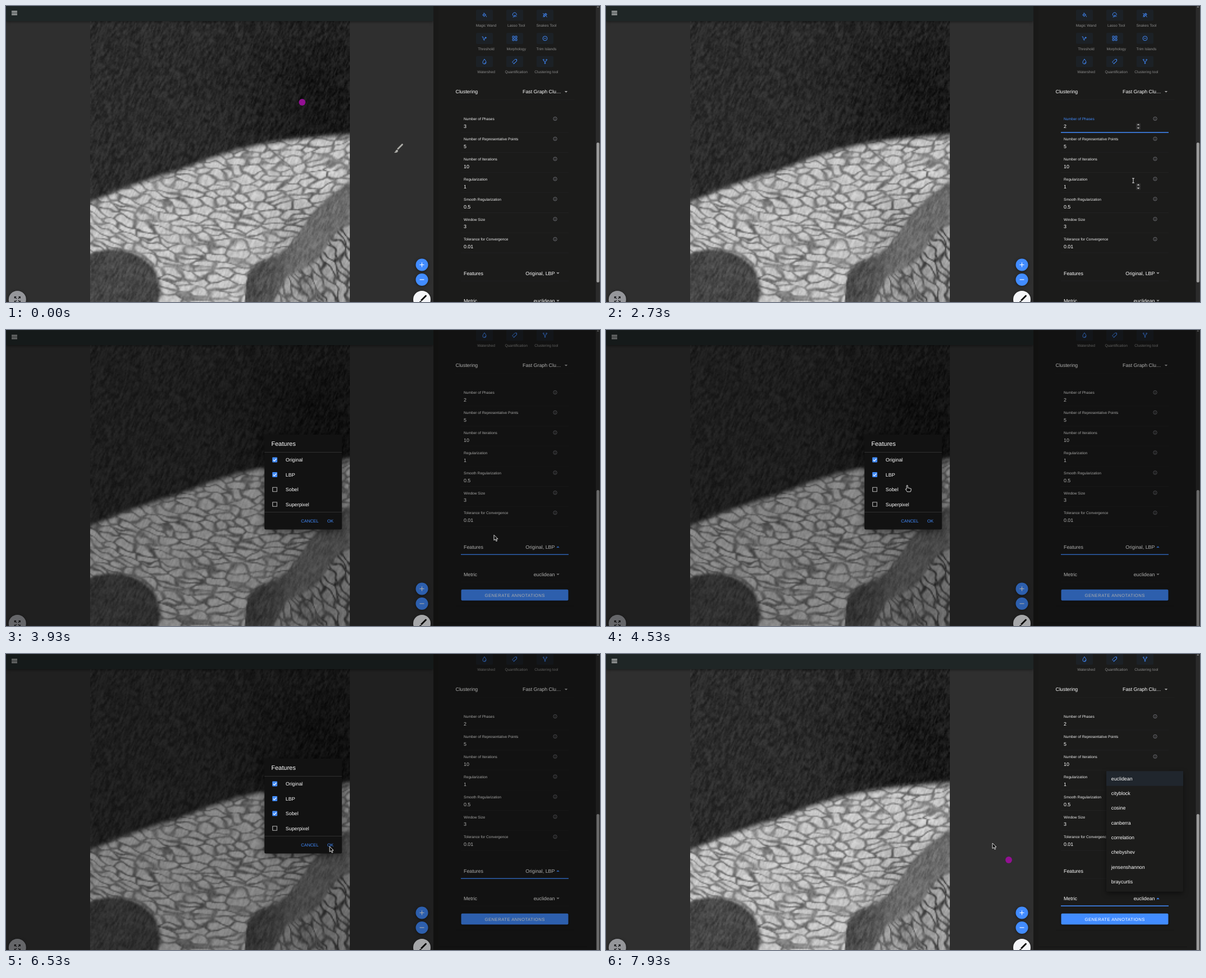
An HTML page with a canvas that plays this animation: 1059 by 529 pixels, repeating every 8 s.

```html
<!DOCTYPE html>
<html lang="en">
<head>
<meta charset="utf-8">
<title>Clustering tool</title>
<style>
html, body { margin: 0; width: 100%; height: 100%; overflow: hidden; background: #1b1b1a; }
canvas { display: block; }
</style>
</head>
<body>
<canvas id="stage" width="1059" height="529"></canvas>
<script>
const ctx = document.getElementById('stage').getContext('2d');
const BLUE = '#428cff', PANEL = '#1b1b1a';
const BIG = 8.83, SMALL = 6.62, BUTTON = 7.72;
const ROW = 35.85;

// ---------- helpers ----------
const clamp = v => Math.min(1, Math.max(0, v));
const mix = (a, b, f) => a + (b - a) * f;
const smooth = v => { v = clamp(v); return v * v * (3 - 2 * v); };

// Piecewise linear interpolation of [position, ...values] keys.
function at(keys, p) {
  const i = keys.findIndex(k => k[0] > p);
  if (i < 0) return keys[keys.length - 1].slice(1);
  if (i === 0) return keys[0].slice(1);
  const a = keys[i - 1], b = keys[i], f = (p - a[0]) / (b[0] - a[0]);
  return a.slice(1).map((v, j) => mix(v, b[j + 1], f));
}

function rect(x, y, w, h, color, r = 0) {
  ctx.fillStyle = color;
  ctx.beginPath();
  ctx.roundRect(x, y, w, h, r);
  ctx.fill();
}

function disc(x, y, r, color) {
  ctx.fillStyle = color;
  ctx.beginPath();
  ctx.arc(x, y, r, 0, 7);
  ctx.fill();
}

function stroke(path, x, y, scale, color, width) {
  ctx.save();
  ctx.translate(x, y);
  ctx.scale(scale, scale);
  ctx.strokeStyle = color;
  ctx.lineWidth = width / scale;
  ctx.stroke(new Path2D(path));
  ctx.restore();
}

function fill(path, x, y, color) {
  ctx.save();
  ctx.translate(x, y);
  ctx.fillStyle = color;
  ctx.fill(new Path2D(path));
  ctx.restore();
}

// y is the middle of the capitals.
function text(s, x, y, size = BIG, color = '#fff', align = 'left') {
  ctx.font = `${size}px "Liberation Sans", Arial, sans-serif`;
  ctx.textAlign = align;
  ctx.fillStyle = color;
  ctx.fillText(s, x, y + size * 0.36);
}

function shadow(blur, y, paint) {
  ctx.save();
  ctx.shadowColor = 'rgba(0,0,0,.5)';
  ctx.shadowBlur = blur;
  ctx.shadowOffsetY = y;
  paint();
  ctx.restore();
}

// ---------- tomography slice ----------
const hash = (i, j) => {
  const s = Math.sin(i * 127.1 + j * 311.7) * 43758.5453;
  return s - Math.floor(s);
};

function noise(x, y) {
  const i = Math.floor(x), j = Math.floor(y), f = smooth(x - i), g = smooth(y - j);
  return mix(mix(hash(i, j), hash(i + 1, j), f), mix(hash(i, j + 1), hash(i + 1, j + 1), f), g);
}

// Distance to the border between neighbouring random cells.
function cellEdge(u, v) {
  const i = Math.floor(u), j = Math.floor(v);
  let near = 9, next = 9;
  for (let a = i - 1; a <= i + 1; a++) for (let b = j - 1; b <= j + 1; b++) {
    const d = Math.hypot(a + hash(a, b) - u, b + hash(b + 57, a) - v);
    if (d < near) { next = near; near = d; } else if (d < next) next = d;
  }
  return next - near;
}

const surface = [[150, 351], [200, 329], [250, 312], [300, 297], [350, 277], [400, 261], [450, 248], [500, 240], [560, 234], [612, 231]];
const lowerEdge = [[422, 560], [430, 480], [445, 461], [480, 445], [510, 425], [525, 403], [540, 375], [570, 345], [612, 313]];
const cornerEdge = [[470, 545], [485, 512], [500, 486], [525, 471], [550, 458], [565, 440], [580, 410], [600, 396], [612, 388]];

function slice(x, y) {
  const across = x * 0.9 + y * 0.4, along = y * 0.9 - x * 0.4;
  const grain = noise(across / 2.3, along / 7) - 0.5 + (hash(x, y) - 0.5) * 0.35;
  const patch = noise(x / 26, y / 18);
  const wx = x + 14 * noise(x / 20, y / 14), wy = y + 8 * noise(x / 17 + 40, y / 12);

  const air = 44 - 21 * Math.exp(-((x - 565) ** 2 + (y - 165) ** 2) / 22000) + grain * 30;
  const corner = x > 470 && y > at(cornerEdge, x)[0] - 12;
  const gap = corner
    ? cellEdge((x * 0.5 + y * 0.85) / 36, (wx * 0.85 - wy * 0.5) / 13)
    : cellEdge(wx / 31, (wy + (x - 420) ** 2 / 1300) / 12.5);
  const crack = (1 - smooth((gap - 0.02) / 0.32)) * (0.45 + 0.55 * patch);
  const slit = x > 463 && x < 512 ? clamp(1 - Math.abs(y - 252 - (x - 465) * 0.85) / 4) : 0;
  const shade = 30 * smooth((x - 420) / 120) * smooth((y - 300) / 110);
  const bone = 192 + patch * 14 - shade - 105 * Math.max(crack, slit * 0.8) + grain * 34;
  const soft = 78 + 28 * smooth((x - 440) / 90) + (patch - 0.5) * 14 + grain * 36;

  let v = mix(air, bone, smooth((y - at(surface, x)[0]) / 17 + 0.5));
  v = mix(v, soft - 8, smooth((1 - Math.hypot((x - 190) / 85, (y - 505) / 70)) * 7 + 0.5));
  if (x > 418) v = mix(v, soft, smooth((y - at(lowerEdge, x)[0]) / 14 + 0.5));
  if (corner) v = mix(v, bone - 12, smooth((y - at(cornerEdge, x)[0]) / 14 + 0.5));
  return v;
}

const scan = document.createElement('canvas');
scan.width = 231;
scan.height = 251;
{
  const c = scan.getContext('2d'), img = c.createImageData(231, 251);
  for (let p = 0; p < 231 * 251; p++) {
    const v = slice(151 + (p % 231) * 2, 28 + Math.floor(p / 231) * 2);
    img.data.set([v, v, v, 255], p * 4);
  }
  c.putImageData(img, 0, 0);
}

// ---------- content ----------
const tools = [
  ['Magic Wand', 'M5 11L11 4 18 11 11 18ZM9 2L12 5M6 11H17M20 15V19'],
  ['Lasso Tool', 'M5 14A8 8 0 1 1 19 12M7 13A2 2 0 1 1 6 18V21M12 11L20 18M12 11V19L15 16'],
  ['Snakes Tool', 'M3 5L9 8 15 4 20 9 15 13 20 20M9 8L5 15 12 14 9 20M9 8L15 13M4 20L9 14M15 4V13'],
  ['Threshold', 'M2 6Q6 2 7 10T11 20L14 10H20M17 7A2 2 0 1 0 17.1 7'],
  ['Morphology', 'M3 3h7v7h-7zM14 3h7v7h-7zM3 14h7v7h-7zM14 14h7v7h-7z'],
  ['Trim Islands', 'M3 12a9 9 0 1 0 18 0a9 9 0 1 0-18 0M8 12h8'],
  ['Watershed', 'M12 2Q19 11 19 15A7 7 0 0 1 5 15Q5 11 12 2ZM16 15A4 4 0 0 1 12 19'],
  ['Quantification', 'M2 14L13 3H20V10L9 21ZM7 22L21 9M17 6h.5'],
  ['Clustering tool', 'M6 3a2 2 0 1 0 .1 0M18 3a2 2 0 1 0 .1 0M12 17a2 2 0 1 0 .1 0M6 7Q6 12 12 12Q18 12 18 7M12 12V17']
];
const fields = [
  ['Number of Phases', '3'], ['Number of Representative Points', '5'], ['Number of Iterations', '10'],
  ['Regularization', '1'], ['Smooth Regularization', '0.5'], ['Window Size', '3'],
  ['Tolerance for Convergence', '0.01']
];
const features = ['Original', 'LBP', 'Sobel', 'Superpixel'];
const metrics = ['euclidean', 'cityblock', 'cosine', 'canberra', 'correlation', 'chebyshev', 'jensenshannon', 'braycurtis'];

const ARROW = 'M0 0V9.5L2.3 7.6 4 11.2 5.6 10.5 4 7H7Z';
const HAND = 'M-1 0Q0-1 1 0V4L7 5.5V8L6 11H0L-3 6.5Q-2.5 5-1 6.5Z';
const BRUSH = 'M7-8L16-17Q18-17 18-15L9-6ZM2-1Q5-3 5-5Q8-8 9-4Q8 0 2-1Z';

// ---------- timeline ----------
const pointerPath = [
  [400, 690, 263], [600, 735, 250], [900, 880, 225], [1200, 956, 211], [1267, 956, 211], [1600, 947, 219],
  [2000, 947, 219], [2733, 940, 312], [2800, 940, 314], [3333, 939, 355], [3600, 944, 386], [3800, 944, 386],
  [4533, 537, 278], [4667, 524, 279], [5000, 509, 282], [5467, 509, 282], [5867, 592, 325], [6200, 581, 342],
  [6267, 581, 342], [6333, 577, 344], [6600, 577, 344], [6667, 579, 345], [6867, 718, 368], [7067, 850, 405],
  [7333, 942, 442], [7400, 942, 442], [7533, 939, 442], [7667, 939, 442], [7933, 689, 338]
];
const dotPath = [[0, 528, 172], [133, 610, 219], [333, 690, 263]];
const scrollPath = [[2733, 0], [2800, 14], [3067, 76], [3200, 90]];
const dialogFade = [[3733, 0], [3933, 1], [6540, 1], [6680, 0]];
const menuFade = [[7667, 0], [7867, 1]];

// ---------- parts ----------
function triangle(x, y, up, color, w = 2.7) {
  const d = up ? -1 : 1;
  fill(`M${-w} ${-d * w / 2}H${w}L0 ${d * w / 2}Z`, x, y, color);
}

function underline(y, focused) {
  if (focused) rect(811, y - 0.7, 192, 1.4, BLUE);
  else rect(811, y - 0.3, 192, 0.6, '#252525');
}

function backdrop() {
  rect(0, 0, 762, 529, '#2f2f2f');
  ctx.drawImage(scan, 150, 27, 462.5, 502);
  shadow(5, 1, () => rect(0, 0, 762, 27, '#1f2626'));
  for (const y of [8.9, 11.9, 14.9]) rect(10, y, 10, 1.2, '#fff');
  rect(762, 0, 297, 529, PANEL);
  rect(762, 0, 9, 529, '#191918');
}

function panel(t, scroll, hover) {
  ctx.save();
  ctx.translate(0, -scroll);
  tools.forEach(([name, path], i) => {
    const col = i % 3, y = 16.5 + Math.floor(i / 3) * 41.4, x = 853 + col * 54;
    rect(x - 15, y - 10, 30, 20, '#1c2126', 2);
    stroke(path, x - 5.3, y - 5.3, 0.44, BLUE, 0.95);
    text(name, 856 + col * 53.7, y + 18.5, SMALL, '#8c8c8c', 'center');
  });

  text('Clustering', 801.5, 153);
  text('Fast Graph Clu…', 921, 153);
  triangle(998.5, 153.3, false, '#a5a5a5');
  rect(801, 167.5, 212, 0.6, '#222');

  const typing = t > 1990 && t < 3790;
  fields.forEach(([label, value], i) => {
    const y = 202 + i * ROW, focused = typing && i === 0;
    text(label, 816, y, SMALL, focused ? BLUE : '#f0f0f0');
    text(i === 0 && t > 1990 ? '2' : value, 816, y + 13);
    if (focused && (t - 2000) % 1000 < 499) rect(820.8, y + 8.5, 0.7, 9, '#fff');
    stroke('M-3.2 0a3.2 3.2 0 1 0 6.4 0a3.2 3.2 0 1 0-6.4 0M0-.5V1.8M0-1.8V-1.2', 979, y - 0.5, 1, '#92949c', 0.65);
    underline(y + 24, focused);
    if (focused || i === hover) {
      rect(945, y + 7.5, 8, 11.5, '#303030', 1);
      triangle(949, y + 9.8, true, '#d8d8d8', 2.2);
      triangle(949, y + 16.3, false, '#d8d8d8', 2.2);
    }
  });

  const inFeatures = t > 3790 && t < 7700, up = inFeatures && t < 6730, inMetric = t > 7700;
  text('Features', 816, 477.5);
  if (t > 6590) text('Original, LB…', 920, 477.5);
  else text('Original, LBP', 926.3, 477.5);
  triangle(984, 477.6, up, up ? BLUE : '#a5a5a5');
  underline(491.2, inFeatures);
  text('Metric', 816, 526.5);
  text('euclidean', 940.7, 526.5);
  triangle(984, 526.8, inMetric, inMetric ? BLUE : '#a5a5a5');
  underline(540.3, inMetric);

  shadow(3, 1, () => rect(811.5, 553.7, 191, 19.8, BLUE, 2));
  ctx.letterSpacing = '0.46px';
  text('GENERATE ANNOTATIONS', 907.2, 564, BUTTON, '#fff', 'center');
  ctx.letterSpacing = '0px';
  rect(802, 583, 211, 0.7, '#151515');
  rect(771, 613, 265, 0.7, '#121212');
  ctx.restore();

  rect(1051.5, 0, 7.5, 529, '#2b2b2b');
  rect(1052.8, 244 + scroll * 0.467, 5, 250, '#9b9b9b', 2.5);
  triangle(1055.3, 1.5, true, '#9b9b9b', 2);
}

function floatingButtons() {
  shadow(5, 1, () => {
    disc(741.5, 462.5, 11, BLUE);
    disc(741.5, 489, 11, BLUE);
    disc(741.5, 524.5, 15.5, '#f4f5f8');
    disc(20.3, 524.5, 15.5, '#95969a');
  });
  stroke('M-4 0H4M0-4V4', 741.5, 462.5, 1, '#fff', 1.1);
  stroke('M-4 0H4', 741.5, 489, 1, '#fff', 1.1);
  fill(BRUSH, 732, 533.5, '#000');
  stroke('M-5-2V-5H-2M2-5H5V-2M5 2V5H2M-2 5H-5V2M-5-5L-1.5-1.5M5-5L1.5-1.5M5 5L1.5 1.5M-5 5L-1.5 1.5',
    20.3, 524.5, 1, '#17181a', 1.2);
}

function dialog(t, alpha) {
  if (!alpha) return;
  ctx.save();
  ctx.globalAlpha = alpha;
  rect(0, 0, 1059, 529, 'rgba(0,0,0,.32)');
  const s = t < 5000 ? mix(0.9, 1, alpha) : 1;
  ctx.translate(530, 271.5);
  ctx.scale(s, s);
  ctx.translate(-530, -271.5);
  shadow(14, 5, () => rect(460.8, 187, 138, 169.5, '#121212', 2.2));
  text('Features', 473, 203.3, 11.03);
  rect(460.8, 218, 138, 0.7, '#3a3a3a');
  rect(460.8, 325, 138, 0.7, '#3a3a3a');
  features.forEach((name, i) => {
    const y = 232 + i * 26.5;
    if (i < 2 || (i === 2 && t > 5460)) {
      rect(474.8, y - 4.4, 8.8, 8.8, BLUE, 1);
      stroke('M-2.8 0L-.8 2 2.9-2', 479.2, y + 0.1, 1, '#fff', 1.2);
    } else {
      stroke('M-3.8-3.8H3.8V3.8H-3.8Z', 479.2, y, 1, '#b5b5b5', 1.1);
    }
    text(name, 498.6, y);
  });
  text('CANCEL', 526, 341.2, BUTTON, BLUE);
  text('OK', 572.7, 341.2, BUTTON, BLUE);
  ctx.restore();
}

function menu(alpha) {
  if (!alpha) return;
  ctx.save();
  ctx.globalAlpha = alpha;
  shadow(9, 3, () => rect(892, 209.3, 137, 215.5, '#1c1c1b', 2));
  rect(892, 209.3, 137, 26.5, '#20262d');
  metrics.forEach((name, i) => text(name, 900.8, 222.4 + i * 26.35));
  ctx.restore();
}

function pointer(x, y, shape) {
  if (shape === 'brush') return fill(BRUSH, x, y, '#adada8');
  if (shape === 'beam') {
    const beam = 'M-2-4H2M0-4V4M-2 4H2';
    stroke(beam, x, y, 1, '#111', 2.2);
    return stroke(beam, x, y, 1, '#eee', 1);
  }
  const path = shape === 'hand' ? HAND : ARROW;
  fill(path, x, y, '#0a0a0a');
  stroke(path, x, y, 1, '#f2f2f2', 0.9);
}

function pointerShape(t, x, y, hover, depth) {
  if (t > 7700) return 'arrow';
  if (t > 3790 && t < 6590) return x > 461 && x < 599 && y > 219 && y < 335 ? 'hand' : 'arrow';
  if (x < 762) return 'brush';
  if (hover >= 0) return x < 944 && depth % 1 < 0.85 ? 'beam' : 'arrow';
  return x > 811 && y > 374 && t > 3300 ? 'hand' : 'arrow';
}

function draw(t) {
  const [x, y] = at(pointerPath, t), [scroll] = at(scrollPath, t);
  const depth = (y + scroll - 198) / ROW;
  const free = t < 3790 || (t > 6740 && t < 7700);
  const hover = free && x > 811 && x < 1003 && depth >= 0 && depth < 7 ? Math.floor(depth) : -1;
  const shape = pointerShape(t, x, y, hover, depth);

  backdrop();
  let dot = null;
  if (t < 400) dot = at(dotPath, t);
  else if (t > 6870) dot = [718, 368];
  else if (shape === 'brush') dot = [x, y];
  if (dot) disc(...dot, 5.9, '#921092');

  panel(t, scroll, hover);
  floatingButtons();
  dialog(t, at(dialogFade, t)[0]);
  menu(at(menuFade, t)[0]);
  pointer(x, y, shape);
}

function tick() {
  const step = Math.floor(((performance.now() + 5) % 8000) * 0.015);
  ctx.textRendering = 'geometricPrecision';
  draw(step / 0.015);
  requestAnimationFrame(tick);
}
tick();
</script>
</body>
</html>
```
